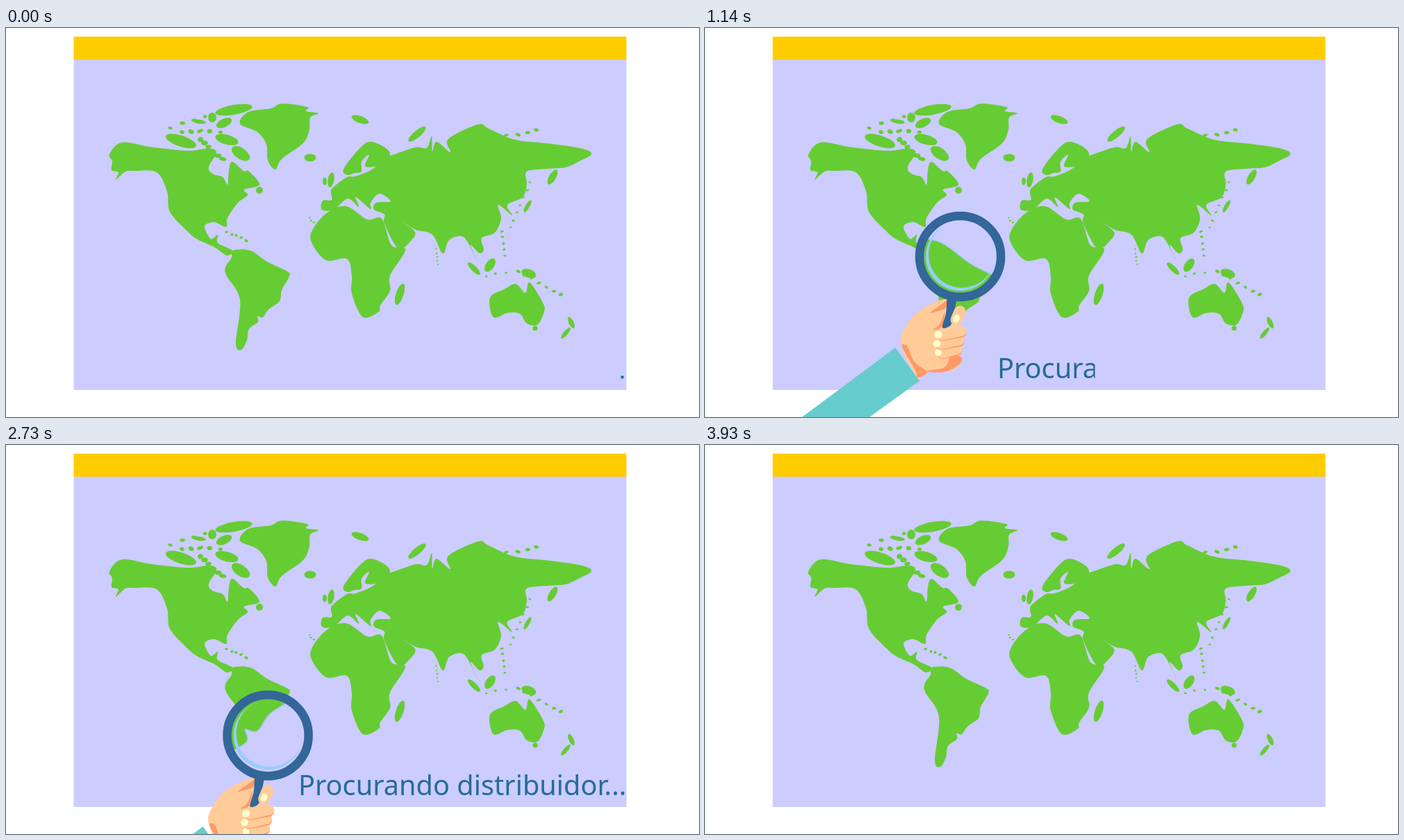
Animation of 998x561 px, one loop 4.44 s. Source, as an HTML page with a canvas:

```html
<!DOCTYPE html>
<html lang="pt">
<head>
<meta charset="utf-8">
<style>
html, body { margin: 0; width: 100%; height: 100%; overflow: hidden; background: #fff; }
canvas { display: block; }
</style>
</head>
<body>
<canvas id="stage" width="998" height="561"></canvas>
<script>
const ctx = document.getElementById('stage').getContext('2d');
const LOOP = 4440, STEP = 30;
const SEA = '#ccccff', LAND = '#66cc33', BLUE = '#336699', INK = '#266b99',
      SKIN = '#ffcc99', SHADE = '#ff9966', NAIL = '#ffffcc', SLEEVE = '#66cccc', GLINT = '#99ccff';

const points = s => s.trim().split(/\s+/).map(p => p.split(',').map(Number));

// Closed smooth curve through a few key points
function blob(s) {
  const p = points(s), n = p.length, path = new Path2D();
  const at = i => p[(i + n) % n];
  path.moveTo(...p[0]);
  for (let i = 0; i < n; i++) {
    const [a, b, c, d] = [at(i - 1), at(i), at(i + 1), at(i + 2)];
    path.bezierCurveTo(b[0] + (c[0] - a[0]) / 6, b[1] + (c[1] - a[1]) / 6,
      c[0] - (d[0] - b[0]) / 6, c[1] - (d[1] - b[1]) / 6, ...c);
  }
  path.closePath();
  return path;
}

function oval(x, y, rx, ry, turn = 0) {
  const path = new Path2D();
  path.ellipse(x, y, rx, ry, turn * Math.PI / 180, 0, 7);
  return path;
}

let seed = 7;
function random() {
  seed = (seed * 16807) % 2147483647;
  return seed / 2147483647;
}

// Small islands scattered along a line
function chain([x0, y0, x1, y1, n, r]) {
  return Array.from({ length: n }, (_, i) => {
    const u = i / (n - 1), stray = () => (random() - 0.5) * r;
    return oval(x0 + (x1 - x0) * u + stray(), y0 + (y1 - y0) * u + stray(),
      r * (0.9 + random() * 0.5), r * (0.6 + random() * 0.3), random() * 60 - 30);
  });
}

const northAmerica = `149,182 167,165 211,172 262,177 291,174 303,180 292,200 297,210 312,215 319,226
  321,205 326,193 342,206 350,207 365,226 343,233 348,241 334,252 319,274 317,287 300,280 286,286 295,304
  305,298 305,310 326,321 318,328 300,316 276,305 260,292 236,265 232,236 217,208 185,206 172,207 158,219
  162,208 152,205 153,192`;
const southAmerica = `326,321 352,321 376,337 405,351 408,358 397,378 394,394 378,406 370,417 362,416
  363,424 350,434 347,450 339,464 331,455 337,392 318,358 316,345 325,331`;
const greenland = `398,109 434,114 432,120 450,123 438,129 437,146 428,166 397,189 388,204 377,191
  375,168 362,150 337,138 349,121 381,116`;
const scandinavia = `486,204 508,175 526,164 552,178 545,196 518,200 523,183 512,193 512,207 502,209 492,212`;
const eurasia = `455,262 456,249 469,248 468,237 471,230 491,215 503,214 527,204 548,187 560,182 590,172
  606,173 613,156 614,178 620,164 640,179 637,160 680,139 695,145 733,161 785,167 830,174 843,182 826,192
  806,201 780,203 750,207 750,225 744,244 722,255 729,270 709,255 713,275 704,295 685,303 688,319 682,325
  669,313 679,337 665,309 655,300 638,306 629,325 614,298 590,291 573,281 589,294 584,306 565,318 545,282
  545,269 530,262 533,252 554,250 538,239 525,252 525,261 504,244 508,258 492,246 472,262`;
const africa = `463,266 490,257 520,276 541,275 555,313 575,320 553,357 553,379 539,400 537,409 514,417
  498,383 498,358 491,333 461,335 440,309 442,290`;
const australia = `697,389 717,377 734,369 748,382 754,367 774,398 774,412 765,428 750,426 740,412 722,411 702,417`;

// x,y,rx,ry,degrees
const islands = points(`328,118,27,7,-10 314,137,12,6,-25 297,129,6,7 278,135,10,3,8 252,163,23,8,18
  318,161,17,7,15 338,181,15,8,35 365,234,5,5 438,187,8.5,5.5 468,219,4.5,11,10 459,221,3,5.5
  510,132,13,5,20 592,153,16,5,-40 787,215,5,12,30 567,384,5.5,16,18 814,425,3.5,9,-25 806,440,3,10,40
  753,354,11,6,20 697,342,6,11,35 674,347,4,12,-45 751,257,3,10,30 762,433,3.5,3.5`);

// from, to, count, size
const chains = [
  [238, 143, 286, 127, 4, 3], [252, 149, 308, 149, 5, 3.5], [280, 161, 312, 188, 6, 4],
  [318, 294, 345, 306, 5, 2.2], [437, 274, 443, 281, 3, 1.5], [619, 319, 622, 341, 5, 1.4],
  [755, 222, 726, 288, 7, 1.7], [714, 293, 719, 328, 5, 2], [737, 350, 800, 385, 7, 2.5],
  [691, 358, 720, 352, 3, 2], [722, 156, 764, 147, 4, 3]
];

const world = [northAmerica, southAmerica, greenland, scandinavia, eurasia, africa, australia].map(blob)
  .concat(islands.map(i => oval(...i)), chains.flatMap(chain));

function fillAll(paths, color) {
  ctx.fillStyle = color;
  paths.forEach(p => ctx.fill(p));
}

function line(x0, y0, x1, y1, width, color) {
  ctx.beginPath();
  ctx.moveTo(x0, y0);
  ctx.lineTo(x1, y1);
  ctx.lineWidth = width;
  ctx.strokeStyle = color;
  ctx.stroke();
}

// The magnifier and hand are drawn around this lens centre
const CX = 367.5, CY = 329.5, ZOOM = 2.2;
const sleeve = new Path2D('M274 461L309 509L168 611H73Z');
const palm = blob('282,456 291,428 310,407 346,391 354,408 362,440 366,484 345,496 316,496 306,504');
const shades = [
  '284,460 291,459 302,482 320,496 306,504 303,494',
  '318,495 345,489 355,472 370,476 365,486 345,496',
  '349,393 346,404 324,411 336,402',
  '345,410 341,431 328,435 338,427'
].map(blob);
const handle = blob('350,386 362,386 360,404 355,427 342,432 347,411');

function drawHand() {
  fillAll([palm], SKIN);
  fillAll(shades, SHADE);
  fillAll([sleeve], SLEEVE);
  fillAll([handle], BLUE);
  ctx.lineCap = 'round';
  line(362, 421, 367, 409, 17, SKIN);
  for (let i = 2; i >= 0; i--) {
    const x = 340 + 2 * (i - 1) ** 2, y = 442 + 13 * i, end = 369 - 3 * i;
    line(x, y + 2, end, y - 3, 15, SHADE);
    line(x, y + 1, end, y - 5, 15, SKIN);
    fillAll([oval(x - 6, y, 5.6 - i * 0.4, 5.7 - i * 0.4)], NAIL);
  }
  fillAll([oval(362, 419, 4.5, 6, 25)], NAIL);
}

function circle(x, y, r) {
  ctx.moveTo(x + r, y);
  ctx.arc(x, y, r, 0, 7);
}

function clipCircle(x, y, r) {
  ctx.beginPath();
  circle(x, y, r);
  ctx.clip();
}

function drawLens(x, y) {
  ctx.save();
  clipCircle(x, y, 54);
  ctx.fillStyle = SEA;
  ctx.fillRect(x - 60, y - 60, 120, 120);
  ctx.save();
  ctx.translate(x, y - 3);
  ctx.scale(ZOOM, ZOOM);
  ctx.translate(-x, -y);
  ctx.strokeStyle = '#a5c8ec';
  ctx.lineWidth = 1.6;
  world.forEach(p => ctx.stroke(p));
  fillAll(world, LAND);
  ctx.restore();

  clipCircle(x, y, 49.5);
  ctx.beginPath();
  ctx.rect(x - 60, y - 60, 120, 120);
  circle(x + 2.5, y - 3, 48);
  ctx.fillStyle = GLINT;
  ctx.fill('evenodd');
  ctx.restore();

  ctx.beginPath();
  circle(x, y, 58.6);
  ctx.strokeStyle = BLUE;
  ctx.lineWidth = 12.5;
  ctx.stroke();
}

// time, x, y of the lens
const route = [
  [30, 387, 632], [480, 386.5, 384], [1140, 367.5, 329.5], [1380, 360, 330], [1770, 402.5, 344],
  [1890, 411, 349], [2190, 395, 374], [2340, 389.5, 393], [2760, 376, 419], [3060, 362, 412],
  [3270, 352, 386], [3800, 352, 640]
];

const slope = (i, k) => (route[i + 1][k] - route[i][k]) / (route[i + 1][0] - route[i][0]);

// Flat at turning points, so the curve never overshoots
function tangent(i, k) {
  if (i === 0) return slope(0, k);
  if (i === route.length - 1) return slope(i - 1, k);
  const a = slope(i - 1, k), b = slope(i, k);
  return a * b > 0 ? 2 * a * b / (a + b) : 0;
}

function lensAt(t) {
  const last = route.length - 1;
  if (t <= route[0][0]) return route[0].slice(1);
  if (t >= route[last][0]) return route[last].slice(1);
  let i = 0;
  while (t >= route[i + 1][0]) i++;
  const span = route[i + 1][0] - route[i][0], u = (t - route[i][0]) / span, v = 1 - u;
  return [1, 2].map(k =>
    v * v * (1 + 2 * u) * route[i][k] + u * v * v * span * tangent(i, k) +
    u * u * (3 - 2 * u) * route[i + 1][k] - u * u * v * span * tangent(i + 1, k));
}

function drawCaption(t) {
  ctx.fillStyle = INK;
  if (t < 870) {
    ctx.fillRect(885.5, 501.5, 4, 4);
    return;
  }
  let shift = 0, left = 410, right = 422 + (t - 870) * 0.517;
  if (t >= 3030) {
    shift = -11 + (t - 3060) * 23 / 870;
    left = 412 + (t - 3060) * 0.568;
    right = 910;
  }
  if (right <= left || t >= 3930) return;
  ctx.save();
  ctx.beginPath();
  ctx.rect(left, 465, right - left, 60);
  ctx.clip();
  ctx.font = '39.7px "Noto Sans", "Open Sans", sans-serif';
  ctx.fillText('Procurando distribuidor...', 421, 505);
  ctx.restore();
}

function draw(t) {
  ctx.fillStyle = '#fff';
  ctx.fillRect(0, 0, 998, 561);
  ctx.fillStyle = SEA;
  ctx.fillRect(97.5, 45, 796, 477);
  ctx.fillStyle = '#ffcc00';
  ctx.fillRect(97.5, 12.5, 796, 33.2);
  fillAll(world, LAND);
  drawCaption(t);

  const [x, y] = lensAt(t);
  if (y > 628) return;
  ctx.save();
  ctx.translate(x - CX, y - CY);
  drawHand();
  ctx.restore();
  drawLens(x, y);
}

const start = performance.now();
function tick() {
  const t = (performance.now() - start) % LOOP;
  draw(Math.floor(t / STEP) * STEP);
  requestAnimationFrame(tick);
}
tick();
</script>
</body>
</html>
```
